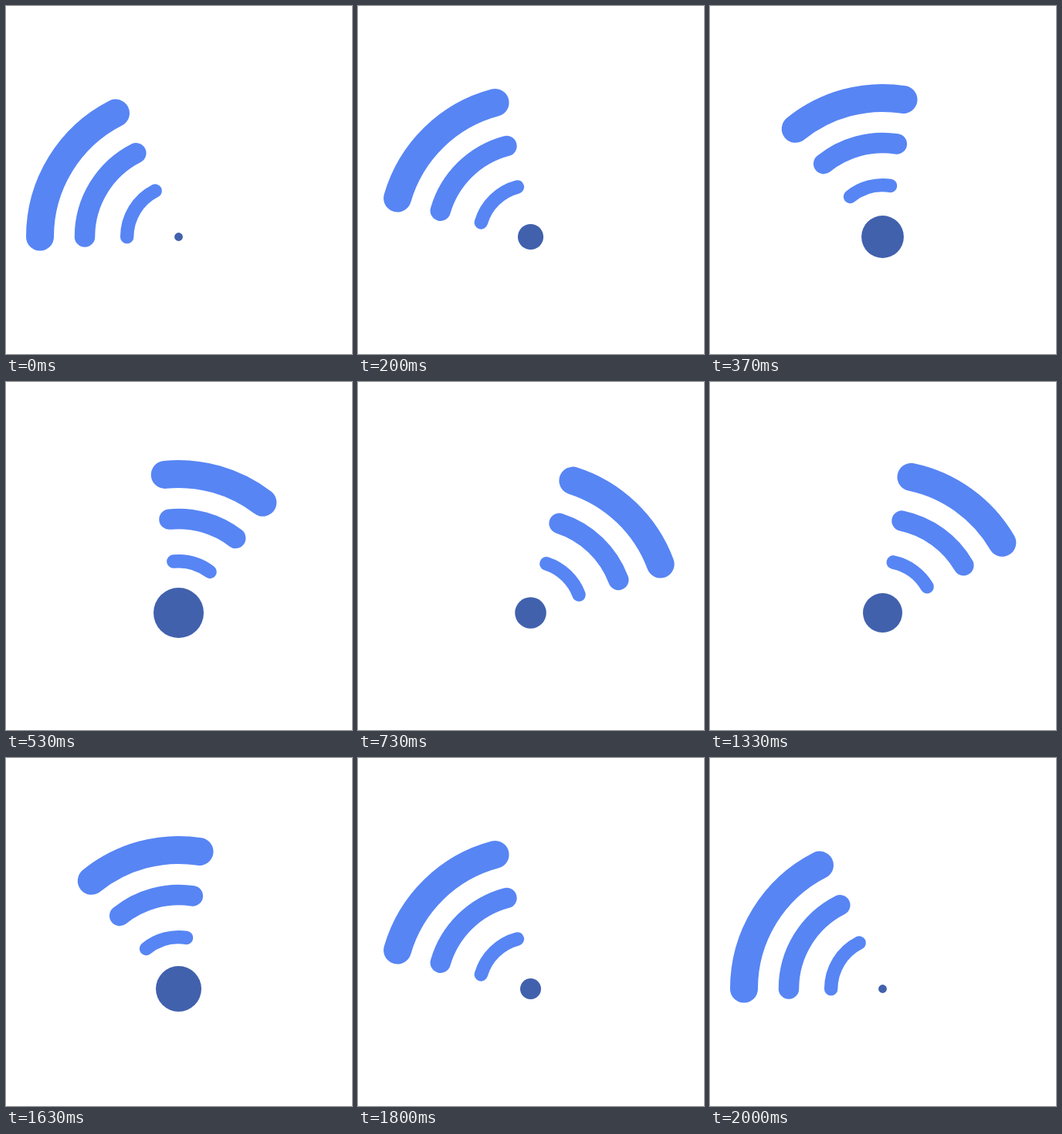
These frames come from a looping animation (448x450 px, 2030 ms). An HTML page:

```html
<!DOCTYPE html>
<html lang="en">
<head>
<meta charset="utf-8">
<title>Signal loader</title>
<style>
html, body { margin: 0; width: 100%; height: 100%; overflow: hidden; background: #fff; }
svg { display: block; width: 448px; height: 450px; }
path { fill: none; stroke: #5785f4; stroke-linecap: round; }
circle { fill: #4161ad; }
</style>
</head>
<body>
<svg viewBox="0 0 448 450">
  <path stroke-width="36"/>
  <path stroke-width="26.5"/>
  <path stroke-width="17.5"/>
  <circle cx="223.5" cy="298.5" r="5.4"/>
</svg>
<script>
const LOOP = 2030, STEPS = 60, HALF = 30, PEAK = 16;
const CX = 223.5, CY = 298.5;
const RADII = [179.5, 121.5, 66.8];
const arcs = document.querySelectorAll('path');
const dot = document.querySelector('circle');

const lerp = (a, b, p) => a + (b - a) * p;

// Cubic Bezier easing, solved by bisection
function bezier(x1, y1, x2, y2) {
  const curve = (a, b, u) => 3 * (1 - u) ** 2 * u * a + 3 * (1 - u) * u * u * b + u ** 3;
  return t => {
    if (t <= 0) return 0;
    if (t >= 1) return 1;
    let lo = 0, hi = 1;
    for (let i = 0; i < 30; i++) {
      const mid = (lo + hi) / 2;
      if (curve(x1, x2, mid) < t) lo = mid; else hi = mid;
    }
    return curve(y1, y2, lo);
  };
}

const tailEase = bezier(0.333, 0, 0.4, 1);
const headEase = bezier(0.333, 0, 0.667, 1);
const growEase = bezier(0.333, 0.22, 0.667, 1);
const shrinkEase = bezier(0.4, 0, 0.48, 1);

// Angles are in degrees clockwise from straight up
function point(r, deg) {
  const a = deg * Math.PI / 180;
  return `${(CX + r * Math.sin(a)).toFixed(3)} ${(CY - r * Math.cos(a)).toFixed(3)}`;
}

function draw(step) {
  const swing = 1 - Math.abs(1 - step / HALF);
  const tail = lerp(-90, 27, tailEase(swing));
  const head = lerp(-27, 90, headEase(swing));
  arcs.forEach((arc, i) => {
    const r = RADII[i];
    arc.setAttribute('d', `M${point(r, tail)}A${r} ${r} 0 0 1 ${point(r, head)}`);
  });

  const beat = step % HALF;
  const size = beat <= PEAK
    ? growEase(beat / PEAK)
    : 1 - shrinkEase((beat - PEAK) / (HALF - PEAK));
  dot.setAttribute('r', lerp(5.4, 32.5, size));
}

// 30 steps a second, on a 10 ms grid
function stepAt(ms) {
  const tick = Math.floor((ms % LOOP) / 10);
  return Math.min(STEPS, Math.floor((tick + 0.5) * 0.3));
}

function play() {
  draw(stepAt(performance.now()));
  requestAnimationFrame(play);
}
play();
</script>
</body>
</html>
```
